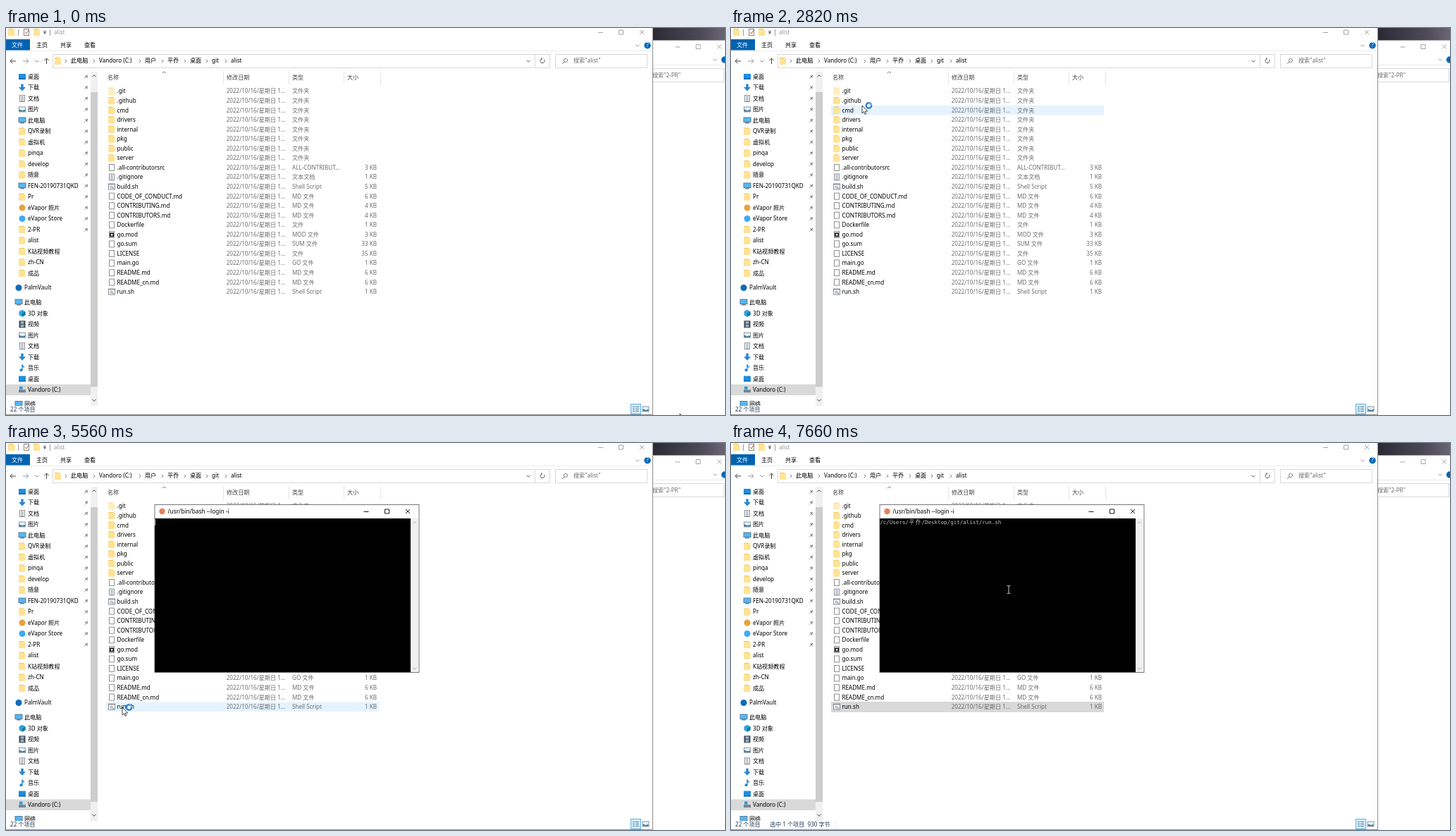
These frames come from a looping animation (1020x549 px, 7.99 s). An HTML page:

```html
<!DOCTYPE html>
<html lang="zh-CN">
<head>
<meta charset="utf-8">
<style>
html, body { margin: 0; width: 100%; height: 100%; overflow: hidden; background: #fff; }
svg { display: block; width: 1020px; height: 549px; font: 8.1px 'Noto Sans', 'Open Sans', 'Noto Sans CJK SC', 'Noto Sans CJK', sans-serif; }
text { white-space: pre; }
.mono { font: 7.5px 'DejaVu Sans Mono', 'Noto Sans CJK SC', monospace; }
</style>
</head>
<body>
<svg id="stage" viewBox="0 0 1020 549"></svg>
<script>
const LOOP = 7990, GREY = '#6d6d6d', ROW = 13.557;
const stage = document.getElementById('stage');

// Markup helpers; text is placed by its vertical centre.
const text = (x, y, s, fill = '#000', more = '') => `<text x="${x}" y="${y + 2.9}" fill="${fill}" ${more}>${s}</text>`;
const rect = (x, y, w, h, fill, more = '') => `<rect x="${x}" y="${y}" width="${w}" height="${h}" fill="${fill}" ${more}/>`;
const box = (x, y, w, h, stroke, fill = 'none') => rect(x + .5, y + .5, w - 1, h - 1, fill, `stroke="${stroke}"`);
const line = (d, stroke, w = 1) => `<path d="${d}" fill="none" stroke="${stroke}" stroke-width="${w}"/>`;
const disc = (x, y, r, fill, more = '') => `<circle cx="${x}" cy="${y}" r="${r}" fill="${fill}" ${more}/>`;
const group = (id, body, more = '') => `<g id="${id}" ${more}>${body}</g>`;
const chevron = (x, y, c = '#555') => line(`M${x - 1.2} ${y - 2.3}l2.3 2.3l-2.3 2.3`, c, .8);
const down = (x, y, c = '#555', s = 1) => line(`M${x - 2.6} ${y - 1.3 * s}l2.6 ${2.6 * s}l2.6 ${-2.6 * s}`, c, 1);
const buttons = (min, max, close, y, c) =>
  line(`M${min - 3.5} ${y + .5}h7M${max - 3} ${y - 3}h6v6h-6zM${close - 3} ${y - 3}l6 6m0 -6l-6 6`, c, .9);

// Small icons, centred on (x, y)
const sheet = (x, y) => box(x - 4, y - 5, 8, 10, '#8f8f8f', '#fff');
const icons = {
  folder: (x, y) => rect(x - 4.5, y - 5, 7, 10, '#f2c75c') + rect(x - 4.5, y - 4, 9, 9, '#ffe394'),
  pale: (x, y) => `<g opacity=".6">${icons.folder(x, y)}</g>`,
  sheet,
  lines: (x, y) => sheet(x, y) + line(`M${x - 2} ${y - 2.5}h4m-4 2h4m-4 2h4m-4 2h4`, '#667f96', .8),
  script: (x, y) => box(x - 5, y - 4.5, 10, 9, '#8a9299', '#f4f6f7') + line(`M${x - 5} ${y - 3.5}h10`, '#70797f') +
    `<circle cx="${x - .5}" cy="${y + .5}" r="1.5" fill="none" stroke="#879097"/>` + disc(x + 2.2, y + 2.2, 1, '#879097'),
  media: (x, y) => sheet(x, y) + rect(x - 3, y - 2.5, 6, 6, '#222') + rect(x - 1.2, y - .8, 2.6, 2.6, '#eee'),
  desktop: (x, y) => rect(x - 5, y - 4, 10, 7.5, '#1b8fe0') + rect(x - 5, y + 2.5, 10, 1.5, '#0b62a8'),
  get: (x, y) => `<path d="M${x - 1.7} ${y - 5}h3.4v4.5h3.3l-5 5.5l-5 -5.5h3.3z" fill="#2b85cf"/>`,
  image: (x, y) => box(x - 5, y - 4, 10, 8, '#8b979f', '#e6f3fb') + `<path d="M${x - 4} ${y + 3}v-3l4 1.5l4 -1v2.5z" fill="#3d7793"/>`,
  pc: (x, y) => box(x - 5.5, y - 4.5, 11, 7.5, '#5b7f99', '#55b8f2') + rect(x - 3, y + 3, 6, 1.5, '#7d8a94'),
  cube: (x, y) => `<path d="M${x} ${y - 5}l4.5 2.5v5l-4.5 2.5l-4.5 -2.5v-5z" fill="#2ca4d8"/><path d="M${x} ${y}v5l4.5 -2.5v-5z" fill="#1577a8"/>`,
  film: (x, y) => rect(x - 4.5, y - 5, 9, 10, '#444') + rect(x - 2.5, y - 4, 5, 3.5, '#8cb4d4') + rect(x - 2.5, y + .5, 5, 3.5, '#8cb4d4'),
  note: (x, y) => disc(x - 1.5, y + 3, 2, '#1a85d6') + line(`M${x} ${y + 3}v-8q0 3 3 4`, '#1a85d6', 1.3),
  disk: (x, y) => rect(x - 5, y, 10, 4, '#7b858c') + rect(x - 4, y - 4.5, 4.5, 4, '#1a9be8'),
  orange: (x, y) => disc(x, y, 4.5, '#e9a13b'),
  sky: (x, y) => disc(x, y, 4.5, '#3fa9f5'),
  blue: (x, y) => disc(x, y, 4.5, '#0f6cbd')
};
const pin = (x, y) => line(`M${x - 3} ${y + 3}l2.5 -2.5`, '#8a8a8a', .8) + line(`M${x - 1.5} ${y - 1.5}l3 3M${x - .3} ${y + .3}l2.3 -2.3`, '#7a7a7a', 1.2);

const side = `desktop|桌面
get|下载
lines|文档
image|图片
pc|此电脑
folder|QVR录制
folder|虚拟机
folder|pinqa
folder|develop
folder|随意
pc|FEN-20190731QKD
folder|Pr
orange|eVapor 照片
sky|eVapor Store
folder|2-PR
folder|alist
folder|K站视频教程
folder|zh-CN
folder|成品
blue|PalmVault
pc|此电脑
cube|3D 对象
film|视频
image|图片
lines|文档
get|下载
note|音乐
desktop|桌面
disk|Vandoro (C:)
pc|网络`.split('\n').map(s => s.split('|'));

const files = `pale|.git
folder|.github
folder|cmd
folder|drivers
folder|internal
folder|pkg
folder|public
folder|server
sheet|.all-contributorsrc|ALL-CONTRIBUT...|3
lines|.gitignore|文本文档|1
script|build.sh|Shell Script|5
sheet|CODE_OF_CONDUCT.md|MD 文件|6
sheet|CONTRIBUTING.md|MD 文件|4
sheet|CONTRIBUTORS.md|MD 文件|4
sheet|Dockerfile|文件|1
media|go.mod|MOD 文件|3
sheet|go.sum|SUM 文件|33
sheet|LICENSE|文件|35
sheet|main.go|GO 文件|1
sheet|README.md|MD 文件|6
sheet|README_cn.md|MD 文件|6
script|run.sh|Shell Script|1`.split('\n').map(s => s.split('|'));

function sidebar() {
  let s = rect(0, 505.5, 120, 15.5, '#d9d9d9');
  side.forEach(([icon, label], i) => {
    const y = i < 19 ? 69 + 15.5 * i : i == 19 ? 368.5 : i == 20 ? 389 : i == 29 ? 533.5 : 404.8 + 15.47 * (i - 21);
    const x = i == 19 || i == 20 || i == 29 ? 26 : 31;
    s += icons[icon](x - 8, y) + text(x, y, label);
    if (i < 15) s += pin(114, y);
  });
  return s + rect(120, 62, 10, 474, '#f0f0f0') + rect(120, 91, 10, 418, '#cdcdcd') +
    down(125, 68, '#444', -1) + down(125, 528, '#444');
}

function fileList() {
  return files.map(([icon, name, type = '文件夹', size], i) => {
    const y = 89.5 + ROW * i;
    return icons[icon](150, y) + text(157.5, y, name) + text(312.7, y, '2022/10/16/星期日 1...', GREY) +
      text(406, y, type, GREY) + (size ? text(526, y, size + ' KB', GREY, 'text-anchor="end"') : '');
  }).join('');
}

function toolbar() {
  const crumbs = [[92, '此电脑'], [132, 'Vandoro (C:)'], [197, '用户'], [229, '平乔'], [261, '桌面'], [292, 'git'], [319, 'alist']];
  return icons.folder(8, 6) + line('M17.5 2v9', '#999') + box(25, 1, 8, 10, '#888', '#fff') + line('M27 6l2 2l3 -5', '#c0562c') +
    icons.folder(43.5, 6) + `<path d="M53 6h4l-2 2.5z" fill="#333"/>` + line('M53 4.5h4', '#333', .8) + line('M62.5 2v9', '#999') +
    rect(0, 16, 34, 15.5, '#0063b1') + text(8, 24, '文件', '#fff') + text(43, 24, '主页') + text(77, 24, '共享') + text(111, 24, '查看') +
    down(896, 25, '#999') + disc(910, 24.7, 4.7, '#0067b8') + text(908.2, 24.5, '?', '#fff') + line('M0 32.5h917', '#ebebeb') +
    line('M14 47h-8m3.2 -3.2l-3.2 3.2l3.2 3.2M57.5 51v-8m-3.2 3.2l3.2 -3.2l3.2 3.2', '#444') +
    line('M24 47h8m-3.2 -3.2l3.2 3.2l-3.2 3.2', '#999') + down(44, 47, '#888', .7) +
    box(66, 37, 706, 20, '#d9d9d9') + line('M750.5 37v20', '#d9d9d9') + icons.folder(73.5, 47) +
    crumbs.map(([x, s]) => chevron(x - 7, 47) + text(x, 46.5, s)).join('') + down(741, 47) +
    line('M763.5 45a3 3 0 1 1 -3 -1.3l-1.5 -1.4m1.5 1.4l-1.8 1', '#444', .9) +
    box(779, 37, 131, 20, '#d9d9d9') + `<circle cx="794" cy="46" r="2.6" fill="none" stroke="#777" stroke-width=".9"/>` +
    line('M792 48l-3 3', '#777') + text(805, 46.5, '搜索"alist"', GREY) +
    text(144, 70, '名称', '#444') + text(313, 70, '修改日期', '#444') + text(406, 70, '类型', '#444') + text(484, 70, '大小', '#444') +
    line('M308.5 61v19M401.5 61v19M479.5 61v19M531.5 61v19', '#e5e5e5') + down(224.5, 63, '#777', -.8);
}

function statusBar() {
  return rect(0, 536, 917, 12, '#fff') + text(6, 541, '22 个项目', '#1e395b') +
    group('picked', text(55, 541, '选中 1 个项目&#160; 930 字节', '#1e395b') + line('M147.5 536v10', '#eee')) +
    box(886, 533, 15, 15, '#5fb2e8', '#d3ecfb') + line('M889 537.5h3m1 0h5m-9 3h3m1 0h5m-9 3h3m1 0h5', '#51707f', .9) + icons.image(907.5, 540.5);
}

function otherWindow() {
  const stops = ['#2a2933', '#3c3a47', '#4d4957', '#6a6675'].map((c, i) => `<stop offset="${i / 3}" stop-color="${c}"/>`).join('');
  return `<linearGradient id="dusk">${stops}</linearGradient>` + rect(917, 0, 103, 17.5, 'url(#dusk)') +
    buttons(953, 982, 1012, 26.5, '#999') + down(1006, 45, '#999') + disc(1019.5, 45, 4.7, '#0067b8') +
    line('M918 52.5h102', '#ebebeb') + box(905, 57, 114, 20, '#d9d9d9') + text(917, 67, '搜索"2-PR"', GREY);
}

const items = [[172, '查看(V)', 1], [187, '排序方式(O)', 1], [202, '分组依据(P)', 1], [217, '刷新(E)'], [236.5, '自定义文件夹(F)...'],
  [255.5, '粘贴(P)'], [270.5, '粘贴快捷方式(S)'], [285.5, '撤消 复制(U)'], [300, '显示效果'], [315, 'Git GUI Here'], [329.7, 'Git Bash Here'],
  [344.5, 'Open Folder as Pyquill Community Edition Project'], [364, '授予访问权限(G)', 1], [383.5, '新建(W)', 1], [403, '属性(R)']];

function menu() {
  return box(206, 162, 268.5, 251, '#a0a0a0', '#eee') + rect(209, 0, 263, 15, '#fff', 'id="itemHover"') +
    [226.5, 246, 354.5, 373.5, 393].map(y => line(`M213 ${y}h255`, '#949494', .9)).join('') +
    items.map(([y, s, sub], i) => text(228.7, y, s, i == 6 ? GREY : '#000') + (sub ? line(`M462.5 ${y - 4}l4 4l-4 4`, '#222', .9) : '')).join('') +
    text(438, 285.5, 'Ctrl+Z') + disc(218.5, 300, 4.7, '#1c2430') + disc(218.5, 315, 4, '#8fb09f') + disc(218.5, 329.7, 4, '#8fb09f') +
    rect(213.5, 339.5, 10, 10, '#111');
}

// Drawn with its corner at the origin
function terminal() {
  return box(-.5, 0, 376, 239, '#777', '#fff') + disc(10.5, 10, 4.2, '#e8805a') +
    text(18.5, 10, '/usr/bin/bash --login -i', '#000', 'font-size="8.3"') + buttons(300, 329.5, 359, 10, '#000') +
    rect(0, 20, 363, 218, '#000') + rect(363, 20, 11, 218, '#f0f0f0') + down(368.5, 26, '#aaa', -1) + down(368.5, 233, '#aaa') +
    group('typed', text(.3, 24.7, '/c/Users/', '#c4c4c4') + text(41.5, 24.7, '平', '#c4c4c4') + text(50.5, 24.7, '乔', '#c4c4c4') +
      text(59.5, 24.7, '/Desktop/git/alist/run.sh', '#c4c4c4'), 'class="mono"') + rect(0, 21, 1, 9, '#bfbfbf', 'id="caret"');
}

// Drag picture and pointers, with the hot spot at the origin
function gear(x, y, r) {
  return `<circle cx="${x}" cy="${y}" r="${r}" fill="none" stroke="#b9c1c6" stroke-width="${r * .6}"/>` +
    `<circle cx="${x}" cy="${y}" r="${r * 1.45}" fill="none" stroke="#b9c1c6" stroke-width="${r * .4}" stroke-dasharray="${r * .57}"/>`;
}
function dragged() {
  return rect(-33, -52, 66, 66, '#000', 'opacity=".12"') + rect(-36, -55, 67, 67, '#dcedf6', 'opacity=".85"') +
    box(-31, -44, 55, 42, '#cbd3d8', '#eef4f7') + rect(-31, -44, 55, 3, '#8f999f') + gear(-9, -26, 6.5) + gear(6, -14, 4.3) +
    box(4, 13, 77, 13, '#888', '#fff') + line('M10.5 22a2.6 2.6 0 0 1 -1 -4.5l1.5 -1.2m-2.5 0h2.7v2.3', '#0a4fc0') +
    `<text x="17" y="22.3" fill="#0033b0">在 <tspan fill="#1b1b5a">alist</tspan> 创建链接</text>`;
}
const beamPath = 'M-2.3 -5.5h1.6l.7 .7l.7 -.7h1.6M-2.3 5.5h1.6l.7 -.7l.7 .7h1.6M0 -5v10';
const pointer = disc(0, 1, 8, '#ffe23d', 'id="press" opacity=".75"') +
  group('arrow', `<path d="M0 0v11l2.5 -2.4l1.7 3.8l1.6 -.7l-1.6 -3.6h3.5z" fill="#fff" stroke="#000" stroke-width=".7"/>`) +
  group('busy', `<circle cx="9.5" cy="0" r="3.7" fill="#eaf6ff" stroke="#2f80cf" stroke-width="2.4"/>` + line('M9.5 -3.7a3.7 3.7 0 0 1 3.7 3.7', '#72b6ee', 1.6)) +
  group('resize', `<path d="M0 -6.5l3.2 3.5h-2.5v6h2.5l-3.2 3.5l-3.2 -3.5h2.5v-6h-2.5z" fill="#fff" stroke="#000" stroke-width=".8"/>`) +
  group('beam', line(beamPath, '#e8e8e8', .9));

stage.innerHTML = rect(0, 0, 1020, 549, '#fff') + otherWindow() + rect(0, 0, 917, 549, '#fff') +
  group('frameEdge', line('M917.5 0v549M0 548.5h918', '#8f8f8f')) + toolbar() +
  group('titleBar', text(68, 6, 'alist', 'currentColor') + buttons(843.5, 872.5, 902, 6, 'currentColor')) + sidebar() +
  rect(142, 0, 387, ROW, '#e5f3ff', 'id="rowHover"') + rect(142.5, 367.5, 386, 14, 'none', 'id="rowPick"') +
  fileList() + statusBar() + group('shell', terminal()) + group('menu', menu()) + group('drag', dragged()) + group('pointer', pointer);

const el = {};
stage.querySelectorAll('[id]').forEach(e => el[e.id] = e);
const show = (id, on) => el[id].style.display = on ? '' : 'none';
const move = (id, x, y, more = '') => el[id].setAttribute('transform', `translate(${x} ${y})${more}`);
const clamp = v => Math.max(0, Math.min(1, v));

// Bursts of screen updates: start, end, number of updates
const bursts = [[70, 800, 12], [870, 1360, 7], [1610, 1890, 5], [2160, 2890, 11], [2960, 3710, 12], [3790, 4250, 8],
  [4450, 5200, 11], [5280, 6030, 12], [6100, 6840, 12], [6900, 7110, 4], [7330, 7400, 2], [7660, 7661, 2]];
function snap(t) {
  let at = 0;
  for (const [a, b, n] of bursts) {
    if (t < a) break;
    const step = (b - a) / (n - 1);
    at = a + Math.min(n - 1, Math.floor((t - a + 4) / step)) * step;
  }
  return at;
}

// Pointer path: time, x, y
const path = [[0, 956, 547], [800, 209, 416], [870, 206, 413], [1610, 206, 413], [1890, 250, 331], [2160, 250, 331], [2820, 186, 110],
  [2890, 184, 107], [3270, 133, 40], [3710, 172, 85], [3930, 183, 104], [4450, 183, 104], [4520, 187, 112], [5200, 354, 96],
  [5540, 165, 375], [5900, 165, 375], [6440, 284, 284], [6600, 880, 535], [6840, 304, 220], [7110, 356, 215], [7330, 356, 215], [7400, 394, 208]];
function pointerAt(t) {
  const i = path.findIndex(k => k[0] > t);
  if (i < 0) return path[path.length - 1].slice(1);
  const a = path[i - 1], b = path[i], p = (t - a[0]) / (b[0] - a[0]), q = p * p * (3 - 2 * p);
  return [a[1] + (b[1] - a[1]) * q, a[2] + (b[2] - a[2]) * q];
}

function draw(time) {
  const t = snap(time), within = (a, b) => t >= a && t < b;
  const [x, y] = pointerAt(t);

  const active = within(870, 2490) || within(5700, 6700);
  el.titleBar.style.color = active ? '#000' : '#999';
  show('frameEdge', !active);

  const row = Math.floor((y - 82.8) / ROW);
  const free = within(2220, 3900) || (within(5280, 5700) && y > 326);
  show('rowHover', free && x > 142 && x < 529 && row >= 0 && row < files.length);
  el.rowHover.setAttribute('y', 82.8 + row * ROW);
  const picked = t >= 5700;
  show('picked', picked);
  show('rowPick', picked || within(870, 2160));
  el.rowPick.setAttribute('fill', !picked ? 'none' : active ? '#cce8ff' : '#d9d9d9');
  el.rowPick.setAttribute('stroke', !picked ? '#aedcf7' : active ? '#99d1ff' : '#d9d9d9');

  show('menu', within(1030, 2160));
  el.menu.setAttribute('opacity', clamp((t - 1000) / 300));
  const item = items.find(m => Math.abs(m[0] - y) < 7.5);
  show('itemHover', within(1611, 2160) && item);
  if (item) el.itemHover.setAttribute('y', item[0] - 7.5);

  show('shell', within(3790, 5700) || t >= 6700);
  const grow = clamp((t - 3790) / 400), scale = 1 - .1 * (1 - grow) ** 1.5;
  const [wx, wy] = t < 4520 ? [44, 103] : t < 5200 ? [x - 143, y - 9] : [211, 87];
  move('shell', wx + 187.5 * (1 - scale), wy + 119 * (1 - scale), ` scale(${scale})`);
  el.shell.setAttribute('opacity', grow ** 1.74);
  const typed = t >= 6960;
  show('typed', typed);
  show('caret', t < 7660);
  el.caret.setAttribute('x', typed ? 172 : 0);

  show('drag', within(5960, 6960));
  move('drag', x, y);
  move('pointer', x, y);
  const resize = within(3920, 4500), beam = t >= 7040;
  show('resize', resize);
  show('beam', beam);
  show('arrow', !resize && !beam);
  show('busy', within(2220, 3920) || within(5280, 6960));
  show('press', within(2160, 2220) || within(4520, 5200) || within(5700, 6960));
}

const begin = performance.now();
function tick() {
  draw((performance.now() - begin) % LOOP);
  requestAnimationFrame(tick);
}
tick();
</script>
</body>
</html>
```
